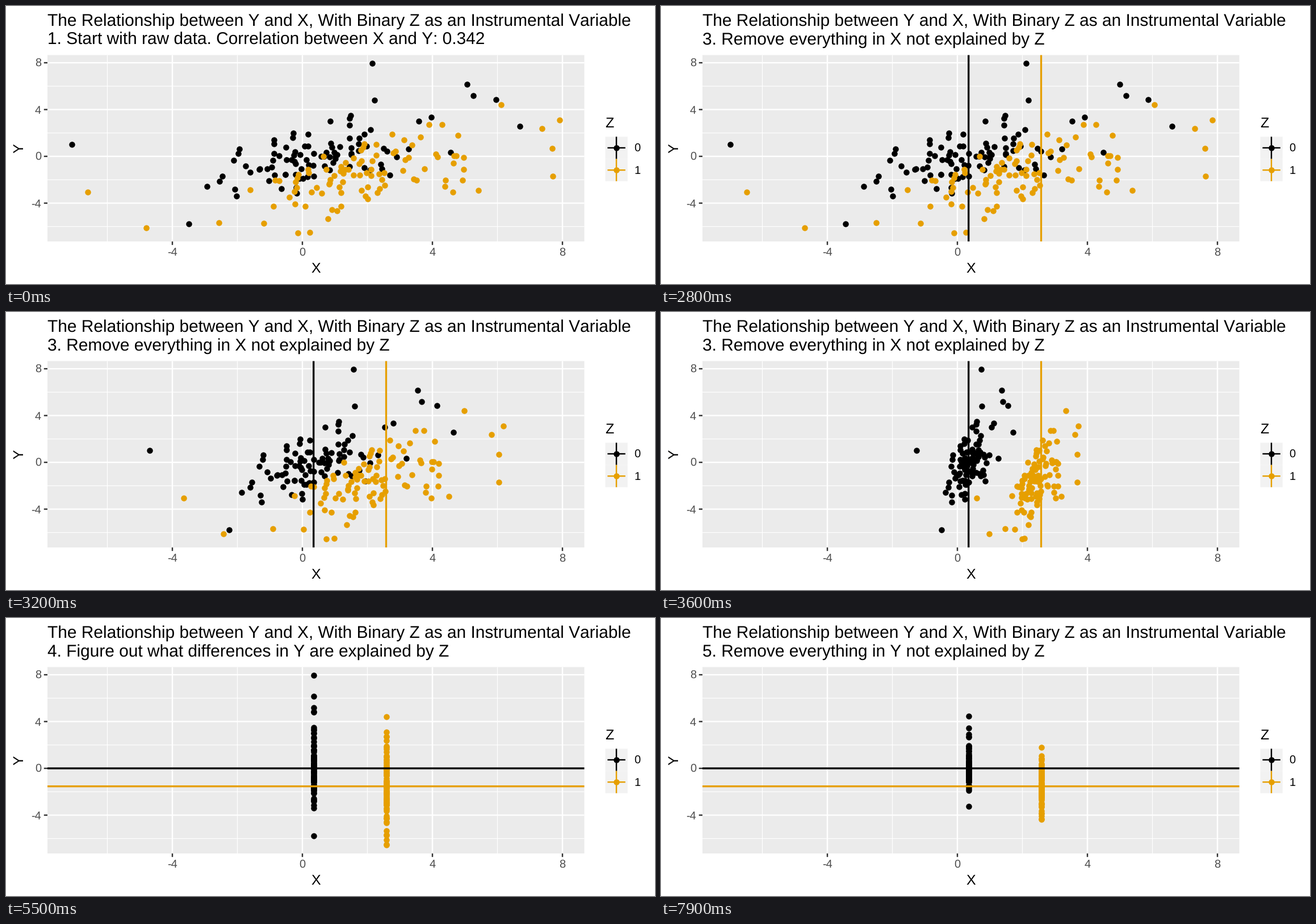
Animation of 1143x490 px, one loop 8000 ms. Source, as a matplotlib script:

```python
import math
import numpy as np
import matplotlib.pyplot as plt
from matplotlib.animation import FuncAnimation
from matplotlib.patches import Rectangle

W, H, DPI = 1143, 490, 64
FRAMES, INTERVAL = 80, 100
STEPS = 13                                   # length of each tween, in frames
BLACK, GOLD = "#000000", "#E69F00"
LEFT, RIGHT, TOP, BOTTOM = 73, 1018.5, 86.5, 415
THIN, LINE, THICK = 1.21, 2.42, 3.3
DOT = 10.5
TITLE, NAME, TICK = 29.94, 24.95, 19.96      # font sizes in pixels
MEANS = ((541.7, 265), (669.5, 296.7))       # group means, stage pixels

STAGES = [
    (0, "1. Start with raw data. Correlation between X and Y: 0.342"),
    (5, "2. Figure out what differences in X are explained by Z"),
    (28, "3. Remove everything in X not explained by Z"),
    (51, "4. Figure out what differences in Y are explained by Z"),
    (74, "5. Remove everything in Y not explained by Z"),
]

plt.rcParams["font.family"] = "Liberation Sans"
plt.rcParams["text.hinting"] = "none"
plt.rcParams["text.kerning_factor"] = 6      # no pair kerning


def px(v):
    """Pixels to points."""
    return v * 72 / DPI


def sx(v):
    return 522 + 57.25 * v


def sy(v):
    return 265 - 20.62 * v


rng = np.random.default_rng(5)


def cloud(far, n, lo, mode, hi, mid, slope, spread):
    """A sloping random band of n points plus a few far ones."""
    x = rng.triangular(lo, mode, hi, n)
    y = mid + slope * (x - mode) + rng.triangular(-spread, 0, spread, n)
    return np.vstack([far, np.column_stack([x, y])])


FAR0 = [(115.5, 244), (322, 384), (645, 101), (649, 166), (749, 196),
        (812, 138), (823, 158), (863, 165), (905, 212), (783, 258)]
FAR1 = [(143.5, 327.5), (247, 390.5), (375, 382), (454, 383), (514, 400),
        (535, 399), (872, 174), (944, 216), (975, 201), (962, 251),
        (963, 300)]
GROUPS = (cloud(FAR0, 88, 345, 520, 735, 273, -0.2, 65),
          cloud(FAR1, 87, 430, 660, 875, 290, -0.2, 72))

fig = plt.figure(figsize=(W / DPI, H / DPI), dpi=DPI, facecolor="white")
ax = fig.add_axes([0, 0, 1, 1])
ax.set_xlim(0, W)
ax.set_ylim(H, 0)
ax.axis("off")


def box(x0, y0, x1, y1, color):
    ax.add_patch(Rectangle((x0, y0), x1 - x0, y1 - y0, fc=color, lw=0,
                           zorder=0, snap=False))


def line(x0, y0, x1, y1, color, width, z=1):
    return ax.plot([x0, x1], [y0, y1], color=color, lw=px(width), zorder=z,
                   solid_capstyle="butt", snap=False)[0]


def dots(x, y, color):
    return ax.plot(x, y, "o", color=color, ms=px(DOT), mew=0, zorder=3,
                   snap=False)[0]


def label(x, y, s, size, color="black", **kw):
    return ax.text(x, y, s, fontsize=px(size), color=color, va="baseline",
                   **kw)


# Panel and grid
box(LEFT, TOP, RIGHT, BOTTOM, "#EBEBEB")
for v in range(-6, 9, 2):
    width = THIN if v % 4 else LINE
    line(sx(v), TOP, sx(v), BOTTOM, "white", width)
    line(LEFT, sy(v), RIGHT, sy(v), "white", width)
for v in range(-4, 9, 4):
    line(sx(v), BOTTOM, sx(v), BOTTOM + 6.2, "#333333", LINE)
    line(LEFT - 6.2, sy(v), LEFT, sy(v), "#333333", LINE)
    label(sx(v), 440.4, str(v), TICK, "#4D4D4D", ha="center")
    label(62, sy(v) + 7.1, str(v), TICK, "#4D4D4D", ha="right")

# Titles
label(LEFT, 35.2, "The Relationship between Y and X, "
      "With Binary Z as an Instrumental Variable", TITLE)
subtitle = label(LEFT, 67.5, "", TITLE)
label(545.5, 470.5, "X", NAME, ha="center")
label(30.6, 250.2, "Y", NAME, ha="center", rotation=90,
      rotation_mode="anchor")

# Legend
label(1055.5, 214.5, "Z", NAME)
for i, color in enumerate((BLACK, GOLD)):
    y = 250 + 39.2 * i
    box(1055.5, y - 19.6, 1094.7, y + 19.6, "#F2F2F2")
    line(1075, y - 19.6, 1075, y + 19.6, color, LINE)
    line(1059.4, y, 1090.8, y, color, LINE)
    dots([1075], [y], color)
    label(1106.5, y + 7.1, str(i), TICK)

points, vlines, hlines = [], [], []
for (mx, my), color in zip(MEANS, (BLACK, GOLD)):
    points.append(dots([], [], color))
    vlines.append(line(mx, TOP, mx, BOTTOM, color, THICK, 4))
    hlines.append(line(LEFT, my, RIGHT, my, color, THICK, 4))


def ease(step):
    """Sine in-out over STEPS frames."""
    t = min(max(step / STEPS, 0), 1)
    return (1 - math.cos(math.pi * t)) / 2


def update(i):
    subtitle.set_text([s for start, s in STAGES if i >= start][-1])
    ex, ey = ease(i - 27), ease(i - 73)
    for p, xy, (mx, my) in zip(points, GROUPS, MEANS):
        x, y = xy.T
        p.set_data(x + (mx - x) * ex, y + (my - y) * ey)
    for v, h in zip(vlines, hlines):
        v.set_visible(9 <= i < 51)
        h.set_visible(i >= 55)
    return points + vlines + hlines + [subtitle]


anim = FuncAnimation(fig, update, frames=FRAMES, interval=INTERVAL,
                     repeat=True, repeat_delay=0)
plt.show()
```
